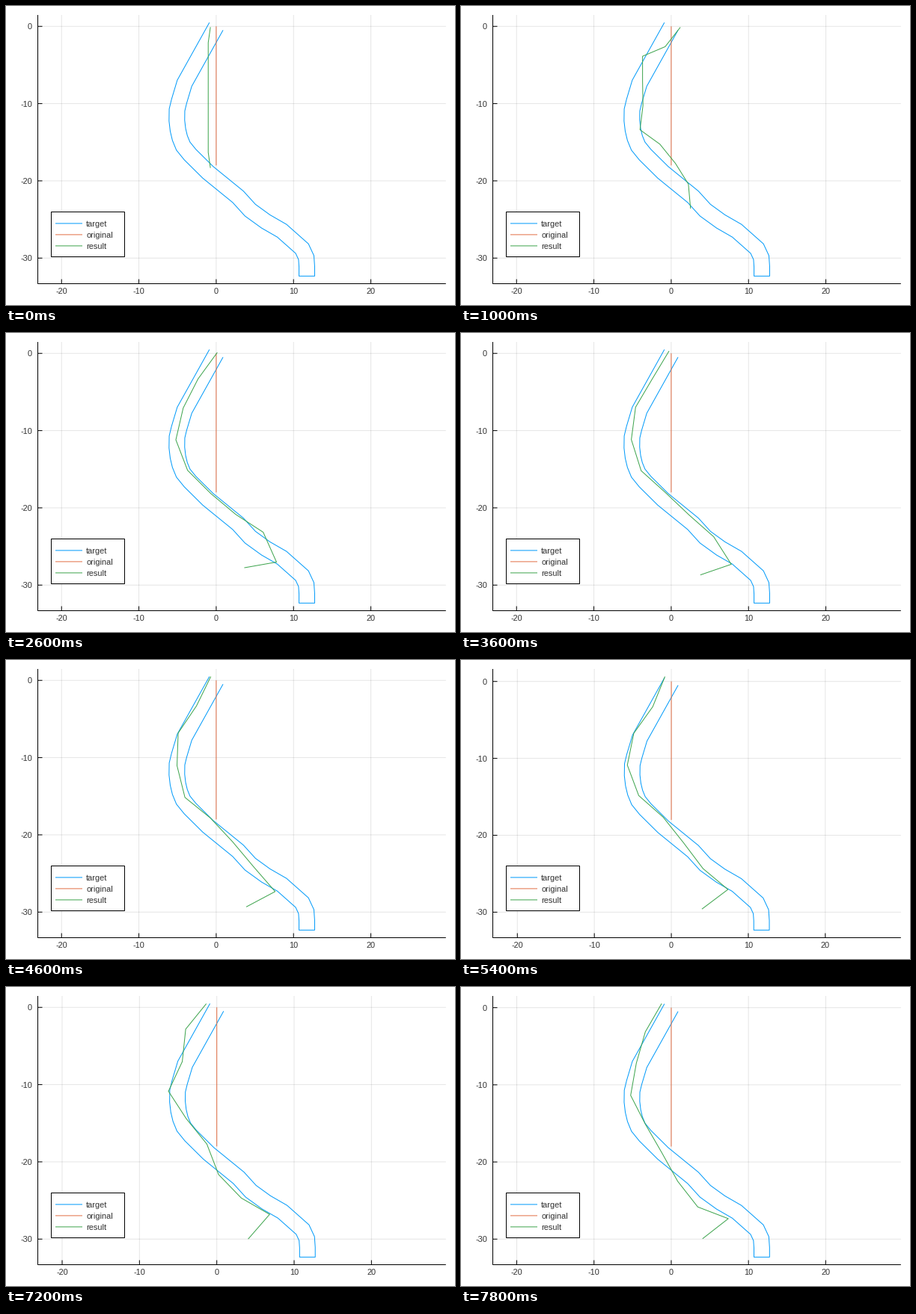
These frames come from a looping animation (600 px wide and 400 px high, 8 s). A matplotlib script:

```python
import numpy as np
import matplotlib.pyplot as plt
from matplotlib.animation import FuncAnimation
from matplotlib.patches import Rectangle

W, H, DPI = 600, 400, 100
FRAMES, STEP = 40, 200
LEFT, RIGHT, TOP, BOTTOM = 42.5, 587.8, 12, 371.5
PX = 72 / DPI
BLUE, ORANGE, GREEN = "#009afa", "#e26f46", "#3da44d"
INK = "#333333"

# Middle of the road; its edges run one unit to either side
CENTRE = np.array([
    (0, 0), (-4.1, -7.36), (-4.8, -9.7), (-5.07, -10.82), (-5.09, -12.2),
    (-4.95, -13.4), (-4.7, -14.45), (-4.27, -15.5), (-3.38, -16.6),
    (-1.06, -18.9), (2.82, -22.06), (4.4, -23.8), (6.4, -25.25),
    (8.5, -26.46), (11.1, -28.77), (11.64, -29.93), (11.72, -31.1),
    (11.72, -32.33),
])
LINE = np.array([(0, 0), (0, -18)])

# Key poses: time, first point, heading of each link in degrees from straight down
POSES = [
    (0, (-.75, -.1), (-8, 0, 0, 0, 0, 0, 0, 0, 8)),
    (1000, (1.18, -.12), (-38, -67, 0, 1, -7, 54, 39, 32, 5)),
    (2600, (.14, .12), (-36, -27, -13, 21, 45, 50, 57, 24, -80)),
    (4600, (-.7, .49), (-26, -34, -2, 14, 51, 43, 40, 41, -62)),
    (6200, (-.96, .78), (-18, -37, -21, 27, 46, 34, 34, 59, -44)),
    (7200, (-1.36, .47), (-39, -6, -25, 33, 39, 21, 44, 60, -41)),
    (7800, (-1.24, .53), (-30, -16, -10, 27, 30, 29, 38, 69, -52)),
]


def offset(path, dist):
    """Parallel of a polyline with mitred corners."""
    d = np.diff(path, axis=0)
    n = np.column_stack([d[:, 1], -d[:, 0]]) / np.hypot(*d.T)[:, None]
    a, b = np.vstack([n[:1], n]), np.vstack([n, n[-1:]])
    mitre = (a + b) / (1 + (a * b).sum(axis=1))[:, None]
    return path + dist * mitre


ROAD = np.vstack([offset(CENTRE, 1.01), offset(CENTRE, -1.01)[::-1]])


def chain(t):
    """Chain of nine equal links that lengthen at first, then only bend."""
    k = max(i for i, pose in enumerate(POSES[:-1]) if pose[0] <= t)
    (t0, p0, a0), (t1, p1, a1) = POSES[k:k + 2]
    u = (t - t0) / (t1 - t0)
    start = np.array(p0) * (1 - u) + np.array(p1) * u
    ang = np.radians(np.array(a0) * (1 - u) + np.array(a1) * u)
    link = min(4.23, 2.03 + 1.15 * t / 1000)
    steps = link * np.column_stack([np.sin(ang), -np.cos(ang)])
    return start + np.vstack([(0, 0), np.cumsum(steps, axis=0)])


def fit(pts):
    """Equal-aspect scale and pixel position of (0, 0), with 3% padding."""
    both = np.vstack([ROAD, pts])
    lo, hi = both.min(axis=0), both.max(axis=0)
    pad = 0.03 * (hi[1] - lo[1])
    s = (BOTTOM - TOP) / (hi[1] - lo[1] + 2 * pad)
    x0 = (LEFT + RIGHT) / 2 - s * (lo[0] + hi[0]) / 2
    y0 = TOP + s * (hi[1] + pad)
    return s, x0, y0


plt.rcParams["font.family"] = "Liberation Sans"
plt.rcParams["font.size"] = 11 * PX
fig = plt.figure(figsize=(W / DPI, H / DPI), dpi=DPI, facecolor="white")
ax = fig.add_axes([0, 0, 1, 1])
ax.set_xlim(0, W)
ax.set_ylim(H, 0)
ax.axis("off")


def stroke(xs=(), ys=(), color="black", z=2, **kw):
    return ax.plot(xs, ys, color=color, lw=PX, zorder=z, snap=False,
                   solid_capstyle="butt", **kw)[0]


def label(x, y, text, ha="left"):
    return ax.text(x, y, text, ha=ha, va="baseline", color=INK, zorder=7)


X_TICKS = range(-20, 21, 10)
Y_TICKS = range(0, -31, -10)
x_axis = [(v, stroke(z=1, alpha=0.1), stroke(), label(0, 385, str(v), "center"))
          for v in X_TICKS]
y_axis = [(v, stroke(z=1, alpha=0.1), stroke(), label(35.2, 0, str(v), "right"))
          for v in Y_TICKS]
stroke([LEFT, LEFT, RIGHT], [TOP, BOTTOM, BOTTOM])

road = stroke(color=BLUE, z=3)
line = stroke(color=ORANGE, z=4)
green = stroke(color=GREEN, z=5)

ax.add_patch(Rectangle((60.5, 275.5), 98, 60, fc="white", ec="black",
                       lw=PX, zorder=6, snap=False))
for i, (name, color) in enumerate(
        [("target", BLUE), ("original", ORANGE), ("result", GREEN)]):
    y = 290.9 + 15 * i
    stroke([66, 102], [y, y], color=color, z=7)
    label(107, y + 4, name)


def draw(i):
    pts = chain(i * STEP)
    s, x0, y0 = fit(pts)
    for art, data in ((road, ROAD), (line, LINE), (green, pts)):
        art.set_data(x0 + s * data[:, 0], y0 - s * data[:, 1])
    for v, grid, mark, name in x_axis:
        x = x0 + s * v
        grid.set_data([x, x], [TOP, BOTTOM])
        mark.set_data([x, x], [BOTTOM - 6, BOTTOM])
        name.set_x(x)
    for v, grid, mark, name in y_axis:
        y = y0 - s * v
        grid.set_data([LEFT, RIGHT], [y, y])
        mark.set_data([LEFT, LEFT + 6], [y, y])
        name.set_y(y + 4)
    return []


anim = FuncAnimation(fig, draw, frames=FRAMES, interval=STEP,
                     repeat=True, repeat_delay=0, blit=False)
plt.show()
```
